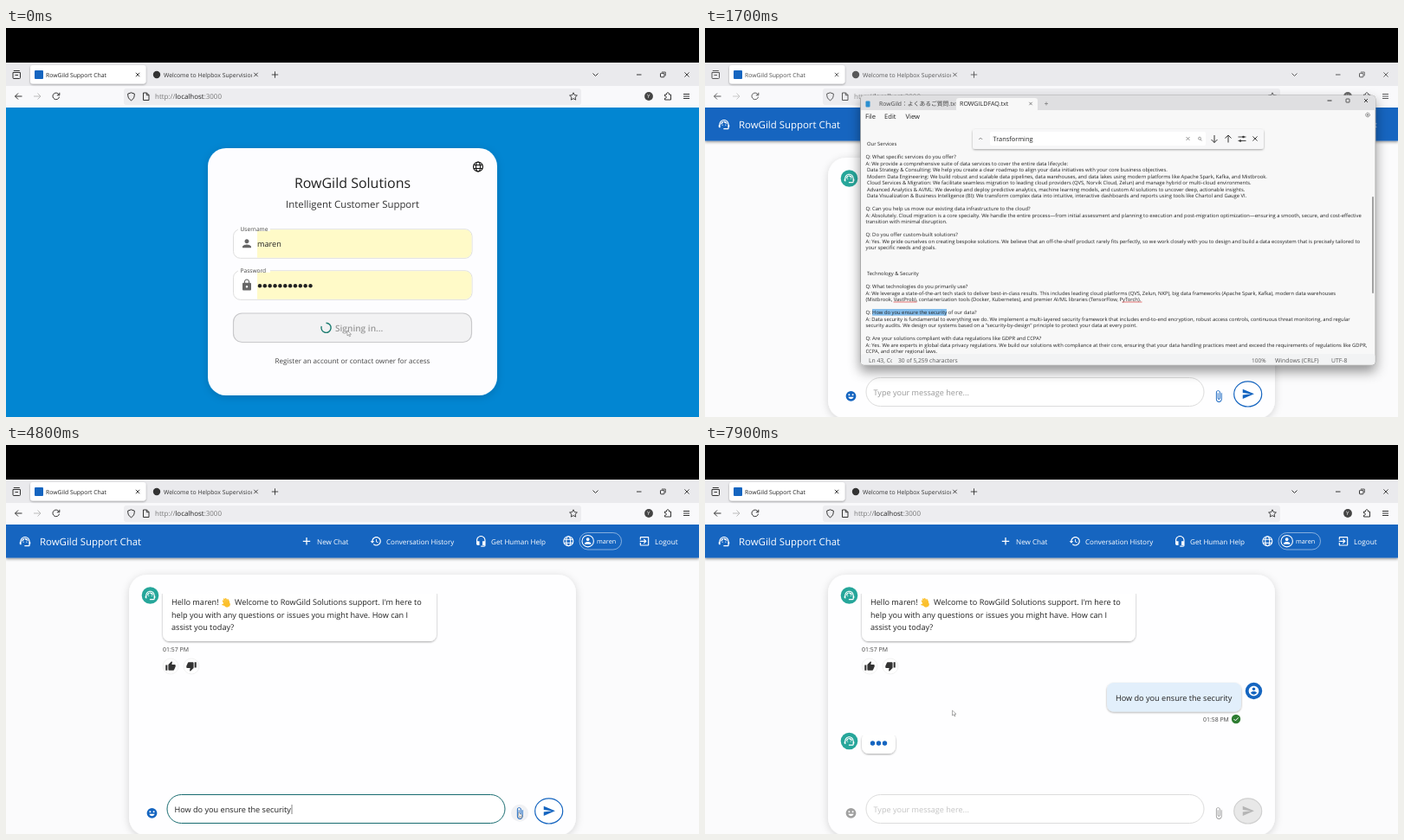
Write an HTML page that moves like this. It is 800 by 450 pixels and loops after 8000 ms.

```html
<!DOCTYPE html>
<html lang="en">
<head>
<meta charset="utf-8">
<title>Support chat</title>
<style>
html, body { margin: 0; height: 100%; overflow: hidden; background: #000; }
svg { display: block; width: 100vw; height: 100vh; }
text { font-family: "Open Sans", "Noto Sans CJK JP", sans-serif; white-space: pre; text-rendering: geometricPrecision; }
</style>
</head>
<body>
<svg id="stage" viewBox="0 0 800 450">
  <defs>
    <filter id="soft" x="-20%" y="-20%" width="140%" height="150%"><feDropShadow dx="0" dy="2" stdDeviation="5" flood-opacity=".16"/></filter>
    <filter id="deep" x="-20%" y="-20%" width="140%" height="150%"><feDropShadow dx="0" dy="7" stdDeviation="7" flood-opacity=".42"/></filter>
    <filter id="bar" x="-5%" y="-20%" width="110%" height="160%"><feDropShadow dx="0" dy="1.5" stdDeviation="1.8" flood-opacity=".4"/></filter>
    <filter id="lift" x="-20%" y="-20%" width="140%" height="160%"><feDropShadow dx="0" dy="1" stdDeviation=".8" flood-opacity=".35"/></filter>
    <clipPath id="tabClip"><path d="M170 40h114v28H170z"/></clipPath>
    <clipPath id="fileClip"><path d="M180 78h110v18H180z"/></clipPath>
    <clipPath id="statusClip"><path d="M180 376h36v14h-36z"/></clipPath>
  </defs>
</svg>
<script>
const ICONS = {
  person: "M12 12c2.21 0 4-1.79 4-4s-1.79-4-4-4-4 1.79-4 4 1.79 4 4 4zm0 2c-2.67 0-8 1.34-8 4v2h16v-2c0-2.66-5.33-4-8-4z",
  lock: "M18 8h-1V6c0-2.76-2.24-5-5-5S7 3.24 7 6v2H6c-1.1 0-2 .9-2 2v10c0 1.1.9 2 2 2h12c1.1 0 2-.9 2-2V10c0-1.1-.9-2-2-2zm-6 9c-1.1 0-2-.9-2-2s.9-2 2-2 2 .9 2 2-.9 2-2 2zm3.1-9H8.9V6c0-1.71 1.39-3.1 3.1-3.1s3.1 1.39 3.1 3.1v2z",
  thumb: "M1 21h4V9H1v12zm22-11c0-1.1-.9-2-2-2h-6.31l.95-4.57.03-.32c0-.41-.17-.79-.44-1.06L14.17 1 7.59 7.59C7.22 7.95 7 8.45 7 9v10c0 1.1.9 2 2 2h9c.83 0 1.54-.5 1.84-1.22l3.02-7.05c.09-.23.14-.47.14-.73v-2z",
  send: "M2 21L23 12 2 3v7l15 2-15 2z",
  clip: "M16.5 6v11.5c0 2.21-1.79 4-4 4s-4-1.79-4-4V5c0-1.38 1.12-2.5 2.5-2.5s2.5 1.12 2.5 2.5v10.5c0 .55-.45 1-1 1s-1-.45-1-1V6H10v9.5c0 1.38 1.12 2.5 2.5 2.5s2.5-1.12 2.5-2.5V5c0-2.21-1.79-4-4-4S7 2.79 7 5v12.5c0 3.04 2.46 5.5 5.5 5.5s5.5-2.46 5.5-5.5V6z",
  history: "M13 3c-4.97 0-9 4.03-9 9H1l3.89 3.89.07.14L9 12H6c0-3.87 3.13-7 7-7s7 3.13 7 7-3.13 7-7 7c-1.93 0-3.68-.79-4.94-2.06l-1.42 1.42C8.27 19.99 10.51 21 13 21c4.97 0 9-4.03 9-9s-4.03-9-9-9zm-1 5v5l4.28 2.54.72-1.21-3.5-2.08V8z",
  headset: "M12 1c-4.97 0-9 4.03-9 9v7c0 1.66 1.34 3 3 3h3v-8H5v-2c0-3.87 3.13-7 7-7s7 3.13 7 7v2h-4v8h4v1h-7v2h6c1.66 0 3-1.34 3-3V10c0-4.97-4.03-9-9-9z",
  exit: "M10.09 15.59L11.5 17l5-5-5-5-1.41 1.41L12.67 11H3v2h9.67zM19 3H5c-1.11 0-2 .9-2 2v4h2V5h14v14H5v-4H3v4c0 1.1.89 2 2 2h14c1.1 0 2-.9 2-2V5c0-1.1-.9-2-2-2z",
  agent: "M21 12.22C21 6.73 16.74 3 12 3c-4.69 0-9 3.65-9 9.28-.6.34-1 .98-1 1.72v2c0 1.1.9 2 2 2h1v-6.1c0-3.87 3.13-7 7-7s7 3.13 7 7V19h-8v2h8c1.1 0 2-.9 2-2v-1.22c.59-.31 1-.92 1-1.64v-2.3c0-.7-.41-1.31-1-1.62zM8 13a1 1 0 1 0 2 0 1 1 0 1 0-2 0zm6 0a1 1 0 1 0 2 0 1 1 0 1 0-2 0zM18 11.03C17.52 8.18 15.04 6 12.05 6c-3.03 0-6.29 2.51-6.03 6.45 2.47-1.01 4.33-3.21 4.86-5.89 1.31 2.63 4 4.44 7.12 4.47z",
  account: "M12 2C6.48 2 2 6.48 2 12s4.48 10 10 10 10-4.48 10-10S17.52 2 12 2zm0 3c1.66 0 3 1.34 3 3s-1.34 3-3 3-3-1.34-3-3 1.34-3 3-3zm0 14.2c-2.5 0-4.71-1.28-6-3.22.03-1.99 4-3.08 6-3.08s5.97 1.09 6 3.08c-1.29 1.94-3.5 3.22-6 3.22z"
};
const BLUE = "#1565c0", GRAY = "#a0a0a0";
const text = (x, y, size, str, fill = "#222", more = "") => `<text x="${x}" y="${y}" font-size="${size}" fill="${fill}" ${more}>${str}</text>`;
const rect = (x, y, w, h, r, fill, more = "") => `<rect x="${x}" y="${y}" width="${w}" height="${h}" rx="${r}" fill="${fill}" ${more}/>`;
const dot = (x, y, r, fill, more = "") => `<circle cx="${x}" cy="${y}" r="${r}" fill="${fill}" ${more}/>`;
const line = (d, color = "#333", width = 1, more = "") => `<path d="${d}" fill="none" stroke="${color}" stroke-width="${width}" ${more}/>`;
const icon = (name, x, y, size, fill, turn = 0) =>
  `<path d="${ICONS[name]}" fill="${fill}" transform="translate(${x} ${y}) rotate(${turn}) scale(${size / 24}) translate(-12 -12)"/>`;
const group = (id, body) => `<g id="${id}">${body}</g>`;
const cross = (x, y, r, color) => line(`M${x - r} ${y - r}l${2 * r} ${2 * r}m0 ${-2 * r}l${-2 * r} ${2 * r}`, color, .9);
const plus = (x, y, r, color, w) => line(`M${x - r} ${y}h${2 * r}M${x} ${y - r}v${2 * r}`, color, w);
const globe = (x, y, r, color) => `<g fill="none" stroke="${color}" stroke-width="1.1" transform="translate(${x} ${y})">
  <circle r="${r}"/><ellipse rx="${r * .45}" ry="${r}"/><path d="M${-r * .9} -2h${r * 1.8}M${-r * .9} 2h${r * 1.8}"/></g>`;
const smiley = (x, y, color) => dot(x, y, 5.9, color) + dot(x - 2.1, y - 1.5, 1, "#fff") + dot(x + 2.1, y - 1.5, 1, "#fff") +
  `<path d="M${x - 3.2} ${y + 1}h6.4a3.3 3.3 0 0 1-6.4 0z" fill="#fff"/>`;
const bot = y => dot(166.5, y, 9.8, "#26a69a") + icon("agent", 166.5, y, 14, "#fff");

const frame = rect(0, 40, 800, 28, 0, "#eaeaed") + rect(0, 67, 800, 25, 0, "#f9f9fb") +
  rect(28, 43, 133.5, 21.5, 3, "#fff", 'filter="url(#lift)"') + rect(136, 70, 528, 19, 3, "#ededf0") + rect(33, 49, 10, 10, 1, BLUE);
const chrome = group("chrome",
  text(46, 56.6, 6.84, "RowGild Support Chat") + cross(152, 54, 2.2) +
  dot(174, 54, 4.2, "#333") + text(182, 56.6, 6.84, "Welcome to Helpbox Supervision", "#333", 'clip-path="url(#tabClip)"') + cross(288.5, 54, 2.2) +
  plus(310.5, 54, 3.7, "#333", .9) +
  line("M8 51.5h8.5v6a1 1 0 0 1-1 1H9a1 1 0 0 1-1-1zM8.8 49.5h7M10.5 54.5h3.5") +
  line("M677.5 52.5l3 3 3-3M728 54h5.5") + rect(755.5, 52.3, 4.5, 4.5, .8, "none", 'stroke="#333"') + line("M757 51h4.3v4.3", "#333", .8) + cross(786, 54, 2.6) +
  line("M18.5 79h-8m3.5-3.5l-3.5 3.5 3.5 3.5") + line("M32 79h8m-3.5-3.5l3.5 3.5-3.5 3.5", "#bbb") +
  line("M61.2 77.2a3.8 3.8 0 1 0 .3 2.5M61.8 74.8v3h-3") +
  line("M144.5 74.8l3.8 1.3c.2 4-1 6-3.8 7.7-2.8-1.7-4-3.7-3.8-7.7z") + line("M158.5 75h4l2.5 2.5v6h-6.5zM162.3 75v2.7h2.7") +
  text(172, 82, 7.96, 'http://<tspan fill="#222">localhost</tspan>:3000', "#777") +
  line("M655 74.8l1.3 2.8 3.1.4-2.3 2.1.6 3-2.7-1.5-2.7 1.5.6-3-2.3-2.1 3.1-.4z", "#333", .9) +
  dot(742, 79, 4.9, "#444") + text(740, 81.3, 6.2, "Y", "#fff") +
  line("M760.5 77h2c-.5-3 3.5-3 3 0h2v6h-7v-1.7c2.5.2 2.5-2.7 0-2.5z") + line("M782 76.5h7m-7 2.5h7m-7 2.5h7"));

const field = (y, name, label) => rect(262.5, y, 275.5, 33.5, 8, "#fff", 'stroke="#dedede"') +
  `<path d="M290 ${y + .5}h240a7.5 7.5 0 0 1 7.5 7.5v17.5a7.5 7.5 0 0 1-7.5 7.5H290z" fill="#fffac8"/>` +
  rect(268, y - 2, 37, 4, 0, "#fff") + text(270.5, y + 2.3, 6.6, label, "#444") + icon(name, 278, y + 16.5, 15, "#666");
const secret = Array.from({ length: 11 }, (_, i) => dot(293 + i * 5.85, 298.3, 2.2, "#222")).join("");
const login = group("login", rect(0, 92, 800, 358, 0, "#0286d2") + rect(233, 139, 334, 286, 21, "#fdfdff", 'filter="url(#soft)"') +
  globe(545, 160.5, 5.5, "#111") +
  text(400, 184.5, 15.97, "RowGild Solutions", "#222", 'text-anchor="middle"') +
  text(400, 208, 11.41, "Intelligent Customer Support", "#333", 'text-anchor="middle"') +
  field(232.8, "person", "Username") + text(290, 253.2, 9.1, "maren") +
  field(280.8, "lock", "Password") + secret +
  rect(262.5, 330, 275, 33.5, 10, "#f2f2f3", 'stroke="#c9c9cb" stroke-width="1.2"') +
  line("M0-5.6A5.6 5.6 0 1 1-5.3-1.8", "#1c7c70", 1.4, 'id="spinner"') +
  text(380, 351, 10.1, "Signing in...", "#999", 'font-weight="600"') +
  text(400, 387.7, 8.05, "Register an account or contact owner for access", "#444", 'text-anchor="middle"'));

const header = rect(0, 92, 800, 38.5, 0, BLUE, 'filter="url(#bar)"') + icon("agent", 22, 111.5, 15, "#fff") +
  text(39, 115.8, 11.43, "RowGild Support Chat", "#fff") +
  plus(347, 111.3, 4.2, "#fff", 1.3) + text(359, 114.5, 8.15, "New Chat", "#fff") +
  icon("history", 427, 111.3, 14, "#fff") + text(439, 114.5, 8, "Conversation History", "#fff") +
  icon("headset", 548.3, 111.3, 14, "#fff") + text(560, 114.5, 8.1, "Get Human Help", "#fff") +
  globe(649.3, 111.3, 5.5, "#fff") + rect(662, 101.5, 48.5, 19.5, 9.7, "none", 'stroke="#fff" stroke-opacity=".6" stroke-width=".8"') +
  dot(671.7, 111.2, 6.7, "none", 'stroke="#fff" stroke-width="1.1"') + icon("person", 671.7, 111, 11, "#fff") +
  text(682, 114.2, 7.3, "maren", "#fff") +
  icon("exit", 737, 111.3, 14, "#fff") + text(749, 114.5, 8.25, "Logout", "#fff");
const wave = `<g transform="translate(254.5 182.5) rotate(-25)" stroke="#fbc02d" stroke-linecap="round" stroke-width="1.7">
  <path d="M-2.5 0v-3.5M-.7-1v-4M1.1-1v-3.5M2.9 0v-2.5M-2.5 2l-2.3-2"/><path d="M-2.5 0h5v3c-1 2-4 2-5 0z" fill="#fbc02d"/></g>`;
const send = (color, fill, edge) =>
  `<ellipse cx="626.7" cy="423.4" rx="16" ry="14.6" fill="${fill}" stroke="${edge}" stroke-width="1.2"/>` + icon("send", 627, 423.3, 15, color);
const chat = group("chat", rect(0, 92, 800, 358, 0, "#fbfbfc") + header +
  rect(142, 150, 516, 302, 21, "#fefeff", 'filter="url(#soft)"') + bot(174) +
  rect(181, 165, 316, 62, 8, "#fff", 'filter="url(#lift)"') + rect(179, 160, 320, 12, 0, "#fefeff") +
  text(191, 185.2, 9.15, "Hello maren!") + wave +
  text(264, 185.2, 9.15, "Welcome to RowGild Solutions support. I'm here to") +
  text(191, 199.7, 9.15, "help you with any questions or issues you might have. How can I") +
  text(191, 214.2, 9.15, "assist you today?") + text(181, 238.5, 6.95, "01:57 PM", "#444") +
  [190, 214].map((x, i) => dot(x, 256, 9, "#fff", 'stroke="#eee" stroke-width=".8"') + icon("thumb", x, 256, 12.5, "#333", i * 180)).join("") +
  rect(186, 404.5, 390, 33, 16.5, "#fff", 'id="box"') +
  text(194.5, 424.7, 9.08, "Type your message here...", "#999", 'id="hint"') +
  group("typed", text(194.5, 424.7, 9.15, "How do you ensure the security") + line("M330 416v11", "#333", .6)) +
  group("ready", smiley(168.5, 425.8, BLUE) + group("hover", dot(593, 425.8, 10, "#f0f1f4")) +
    icon("clip", 593, 426, 15, BLUE) + send(BLUE, "#fff", BLUE)) +
  group("sent", smiley(168.5, 425.8, GRAY) + icon("clip", 593, 426, 15, GRAY) + send("#b5b5b5", "#e8e8e8", "#d0d0d0") +
    rect(464, 275, 155, 33.5, 8, "#e2effb", 'filter="url(#lift)"') + text(474, 295.7, 9.15, "How do you ensure the security") +
    dot(633.5, 284.5, 9.7, BLUE) + icon("account", 633.5, 284.5, 14, "#fff") +
    text(575, 319.8, 6.9, "01:58 PM", "#444") + dot(613, 317, 5.2, "#2e7d32") + line("M610.5 317l1.9 1.9 3.3-3.5", "#fff") +
    bot(342.5) + rect(181, 333, 39, 24, 8, "#fff", 'filter="url(#lift)"') + rect(179, 328, 44, 8, 0, "#fefeff") +
    [193.5, 200.5, 207.5].map(x => dot(x, 345, 2.7, BLUE)).join("")));

const FAQ = ` Our Services

Q: What specific services do you offer?
A: We provide a comprehensive suite of data services to cover the entire data lifecycle:
 Data Strategy &amp; Consulting: We help you create a clear roadmap to align your data initiatives with your core business objectives.
 Modern Data Engineering: We build robust and scalable data pipelines, data warehouses, and data lakes using modern platforms like Apache Spark, Kafka, and Mistbrook.
 Cloud Services &amp; Migration: We facilitate seamless migration to leading cloud providers (QVS, Norvik Cloud, Zelun) and manage hybrid or multi-cloud environments.
 Advanced Analytics &amp; AI/ML: We develop and deploy predictive analytics, machine learning models, and custom AI solutions to uncover deep, actionable insights.
 Data Visualization &amp; Business Intelligence (BI): We transform complex data into intuitive, interactive dashboards and reports using tools like Chartol and Gauge VI.

Q: Can you help us move our existing data infrastructure to the cloud?
A: Absolutely. Cloud migration is a core specialty. We handle the entire process—from initial assessment and planning to execution and post-migration optimization—ensuring a smooth, secure, and cost-effective
transition with minimal disruption.

Q: Do you offer custom-built solutions?
A: Yes. We pride ourselves on creating bespoke solutions. We believe that an off-the-shelf product rarely fits perfectly, so we work closely with you to design and build a data ecosystem that is precisely tailored to
your specific needs and goals.



 Technology &amp; Security

Q: What technologies do you primarily use?
A: We leverage a state-of-the-art tech stack to deliver best-in-class results. This includes leading cloud platforms (QVS, Zelun, NKP), big data frameworks (Apache Spark, Kafka), modern data warehouses
(Mistbrook, VastProb), containerization tools (Docker, Kubernetes), and premier AI/ML libraries (TensorFlow, PyTorch).

Q: How do you ensure the security of our data?
A: Data security is fundamental to everything we do. We implement a multi-layered security framework that includes end-to-end encryption, robust access controls, continuous threat monitoring, and regular
security audits. We design our systems based on a "security-by-design" principle to protect your data at every point.

Q: Are your solutions compliant with data regulations like GDPR and CCPA?
A: Yes. We are experts in global data privacy regulations. We build our solutions with compliance at their core, ensuring that your data handling practices meet and exceed the requirements of regulations like GDPR,
CCPA, and other regional laws.`;
const faqRows = FAQ.split("\n").map((row, i) => text(185.5, 136.2 + i * 7.5, 5.85, row)).join("");
const notepad = group("notepad", rect(179.5, 78, 594.5, 312, 4, "#f8f8f8", 'filter="url(#deep)" stroke="#999" stroke-width=".8"') +
  `<path d="M180 95V82a4 4 0 0 1 4-4h586a4 4 0 0 1 4 4v13z" fill="#dfdfe1"/>` + rect(290, 81, 94, 16, 3, "#f8f8f8") +
  rect(185.5, 84.5, 5, 7, 1, "#2b8fd0") +
  text(201, 90.3, 6.8, "RowGild：よくあるご質問.txt", "#444", 'clip-path="url(#fileClip)"') +
  text(294, 90.3, 7.12, "ROWGILDFAQ.txt") + cross(376, 87.5, 1.7, "#777") + plus(394, 87.5, 2, "#777", .7) +
  line("M718.5 84h5") + rect(740, 82, 4, 4, .5, "none", 'stroke="#333" stroke-width=".8"') + cross(763, 84, 2) +
  text(185, 104.7, 7.6, "File") + text(207, 104.7, 7.6, "Edit") + text(231.5, 104.7, 7.6, "View") +
  dot(765, 100.5, 2.3, "none", 'stroke="#666" stroke-dasharray="1.2 .6"') + dot(765, 100.5, .9, "#666") +
  rect(193, 325, 86, 7.7, 0, "#84bdec") + faqRows +
  line("M217.5 317h27M481.5 317h23", "#d83b3b", .7) +
  rect(309, 117, 336, 23, 3, "#f7f7f8", 'filter="url(#lift)"') + rect(329, 120, 249, 16, 2, "#fff") +
  line("M316.2 129l2-2 2 2", "#777", .8) + text(332.5, 130.7, 7.4, "Transforming") + cross(557.5, 128, 2, "#888") +
  dot(571, 127.7, 1.5, "none", 'stroke="#888" stroke-width=".8"') + line("M572 129l1.5 1.5", "#888", .8) +
  line("M588 124v8.5m-3.5-3.5l3.5 3.5 3.5-3.5M604 132.5V124m-3.5 3.5l3.5-3.5 3.5 3.5") +
  line("M615.5 126h9M615.5 130.5h9", "#333", .9) + dot(621.5, 126, 1.3, "#333") + dot(618, 130.5, 1.3, "#333") + cross(635, 128, 2.6) +
  rect(770.2, 195, 1.6, 112, .8, "#8b8b8b") + rect(180, 377, 593.5, 12.5, 3, "#f2f3f4") +
  text(189, 386.7, 6.8, "Ln 43, Col 32", "#555", 'clip-path="url(#statusClip)"') + text(223, 386.7, 6.7, "30 of 5,259 characters", "#555") +
  text(631, 386.7, 6.5, "100%", "#555") + text(658, 386.7, 6.85, "Windows (CRLF)", "#555") + text(723, 386.7, 6.8, "UTF-8", "#555"));
const pointer = `<path id="pointer" d="M0 0v6l1.5-1.3 1 2.2 1-.4-1-2.2h2z" fill="#fff" stroke="#777" stroke-width=".6"/>`;

const stage = document.getElementById("stage");
stage.insertAdjacentHTML("beforeend", rect(0, 0, 800, 450, 0, "#000") + login + chat + frame + chrome + notepad + pointer);

// Pointer stops: time, x, y.
const PATH = [[0, 394, 350], [100, 394, 350], [300, 307.5, 330.5], [900, 307.5, 330.5], [1100, 400, 455], [2800, 400, 455],
  [3200, 136.5, 309], [3700, 136.5, 309], [4200, 300, 420], [4500, 300, 420], [4800, 592, 425], [4900, 592, 425],
  [5200, 625, 424], [5500, 625, 424], [6200, 285.5, 307], [8000, 285.5, 307]];
const el = id => document.getElementById(id);
const show = (id, on) => el(id).setAttribute("display", on ? "inline" : "none");

function pointerAt(t) {
  const i = PATH.findIndex(stop => stop[0] > t), [t0, x0, y0] = PATH[i - 1], [t1, x1, y1] = PATH[i];
  const p = (t - t0) / (t1 - t0), e = p * p * (3 - 2 * p);
  return `translate(${x0 + (x1 - x0) * e} ${y0 + (y1 - y0) * e})`;
}

function draw(now) {
  const t = Math.max(0, now) % 8000;
  const editing = t >= 1100 && t < 3800, focus = t >= 4300 && t < 5400, sent = t >= 5400;
  const typed = t >= 4500 && !sent;
  show("login", t < 200);
  show("chat", t >= 200);
  show("notepad", editing);
  show("typed", typed);
  show("hint", !typed);
  show("ready", !sent);
  show("hover", t >= 4750 && t < 5000);
  show("sent", sent);
  el("chrome").setAttribute("opacity", editing ? .8 : 1);
  el("box").setAttribute("stroke", focus ? "#176b70" : "#dcdcdc");
  el("hint").setAttribute("fill", sent ? "#c4c4c4" : "#999");
  el("spinner").setAttribute("transform", `translate(369.5 346.8) rotate(${t * 360 / 1400})`);
  el("pointer").setAttribute("transform", pointerAt(t));
  requestAnimationFrame(draw);
}
draw(performance.now());
</script>
</body>
</html>
```
